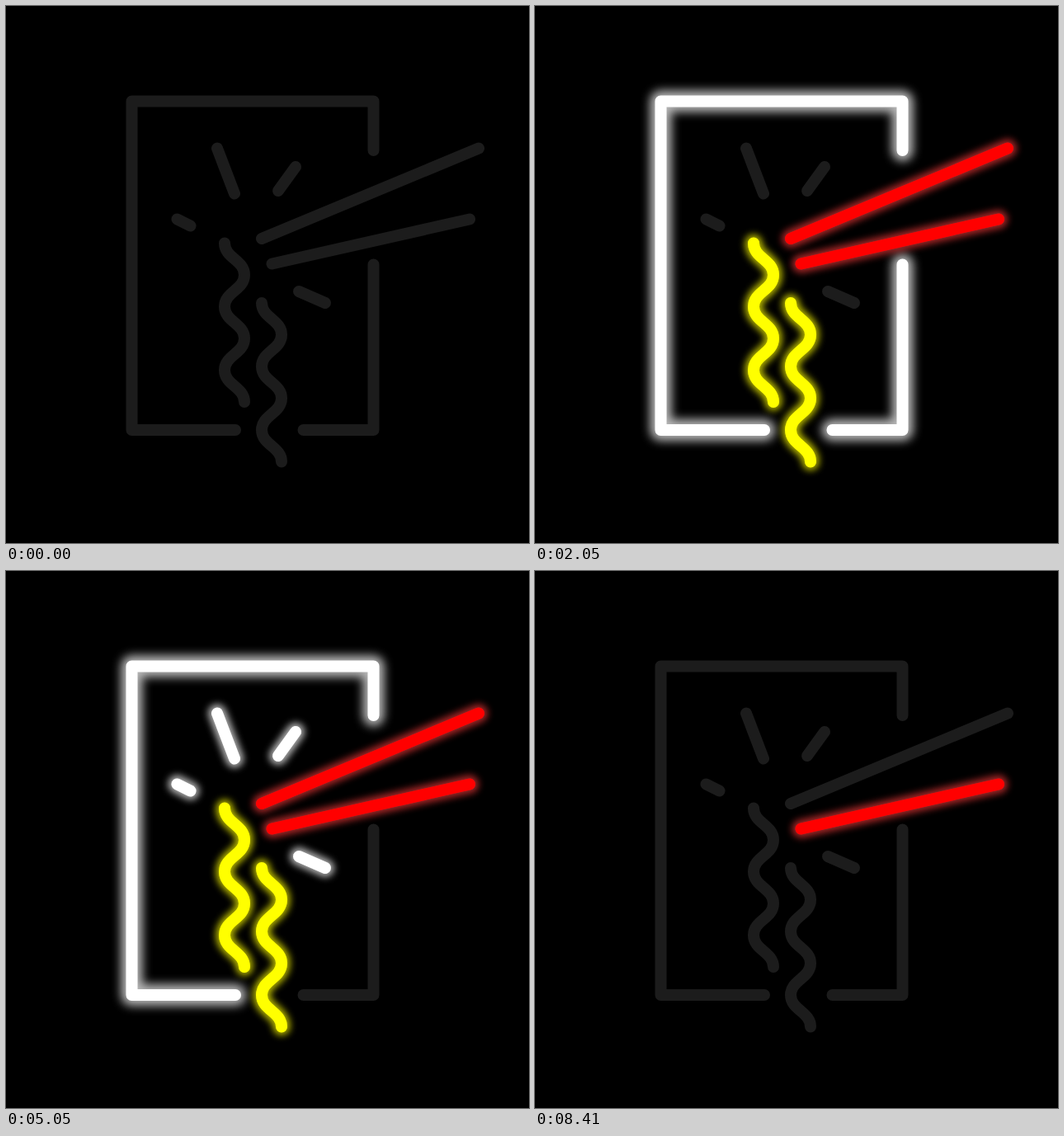
Recreate the animation shown at these times as an HTML page. Size 634 by 651 pixels, loop 8610 ms.

```html
<!DOCTYPE html>
<html lang="en">
<head>
<meta charset="utf-8">
<title>Neon noodles</title>
<style>
  html, body { margin: 0; height: 100%; background: #000; overflow: hidden; }
  svg { display: block; width: 100vw; height: 100vh; }
  path { fill: none; stroke-width: 14; stroke-linecap: round; stroke-linejoin: round; }
</style>
</head>
<body>
<svg id="sign" viewBox="0 0 634 651">
  <filter id="soft" filterUnits="userSpaceOnUse" x="0" y="0" width="634" height="651" color-interpolation-filters="sRGB">
    <feGaussianBlur stdDeviation="4.5"/>
  </filter>
  <filter id="wide" filterUnits="userSpaceOnUse" x="0" y="0" width="634" height="651" color-interpolation-filters="sRGB">
    <feGaussianBlur stdDeviation="6"/>
  </filter>
</svg>
<script>
const LOOP = 8610;
const sign = document.getElementById('sign');

// Five half waves, swinging right and left on the way down
const noodle = (x, y) => {
  let d = `M${x} ${y}`;
  for (let i = 0; i < 5; i++) {
    const dx = i % 2 ? -24 : 24;
    d += `c0 18 ${dx} 20.5 ${dx} 38.5`;
  }
  return d;
};

const WHITE = { color: '#fff', glow: '#fff', alpha: 0.7, width: 22, blur: 'soft' };
const FRAME = { color: '#fff', glow: '#fff', alpha: 0.72, width: 26, blur: 'wide' };
const RED = { color: '#f00', glow: '#ff3c3c', alpha: 0.65, width: 22, blur: 'soft' };
const YELLOW = { color: '#ff0', glow: '#ff0', alpha: 0.72, width: 21, blur: 'soft' };

// Tubes from back to front; each has a one-letter key
const tubes = [
  ['i', FRAME, 'M445.5 175V115.5H152.5V514H278'],
  ['j', FRAME, 'M445.5 313.5V514H360.5'],
  ['e', WHITE, 'M351 195L330 224'],
  ['f', WHITE, 'M256 172.5L277 227.5'],
  ['g', WHITE, 'M207.5 258.5L223.5 266.5'],
  ['h', WHITE, 'M355 346L387 360'],
  ['b', RED, 'M310 282L573 172.5'],
  ['a', RED, 'M322.5 312.5L562 258.5'],
  ['d', YELLOW, noodle(265, 287.5)],
  ['c', YELLOW, noodle(310, 360)]
];

// Start time and the tubes lit from then on
const steps = [
  [0, ''], [200, 'a'], [400, 'ab'], [600, 'abc'], [800, 'acd'], [830, 'abcd'],
  [1030, 'abcde'], [1230, 'abcdef'], [1430, 'abcdefg'], [1630, 'abcdefgh'],
  [1830, 'abcdefghi'], [1850, 'abcdefghij'],
  [2050, 'abcdij'], [2550, 'abcdefghij'], [3050, 'abcdij'],
  [3550, 'abcdefghij'], [4050, 'abcdij'], [4550, 'abcdefghij'],
  [5050, 'abcdefghi'], [5070, 'abcdefghij'], [5270, 'abcdij'], [5290, 'abcdefghij'],
  [8290, 'abcdefgh'], [8310, 'abcdefg'], [8330, 'abcdef'], [8350, 'abcde'],
  [8370, 'abcd'], [8390, 'abc'], [8410, 'a']
];

const add = (parent, name, attrs) => {
  const node = document.createElementNS('http://www.w3.org/2000/svg', name);
  for (const key in attrs) node.setAttribute(key, attrs[key]);
  return parent.appendChild(node);
};

for (const [, , d] of tubes) add(sign, 'path', { d, stroke: '#1c1c1c' });

const lights = tubes.map(([key, look, d]) => {
  const node = add(sign, 'g', {});
  add(node, 'path', {
    d, stroke: look.glow, opacity: look.alpha,
    style: `stroke-width:${look.width}px`, filter: `url(#${look.blur})`
  });
  add(node, 'path', { d, stroke: look.color });
  return { key, node };
});

function draw() {
  const t = performance.now() % LOOP;
  const lit = steps.filter(([start]) => start <= t).pop()[1];
  for (const { key, node } of lights) {
    node.style.display = lit.includes(key) ? '' : 'none';
  }
  requestAnimationFrame(draw);
}
draw();
</script>
</body>
</html>
```
